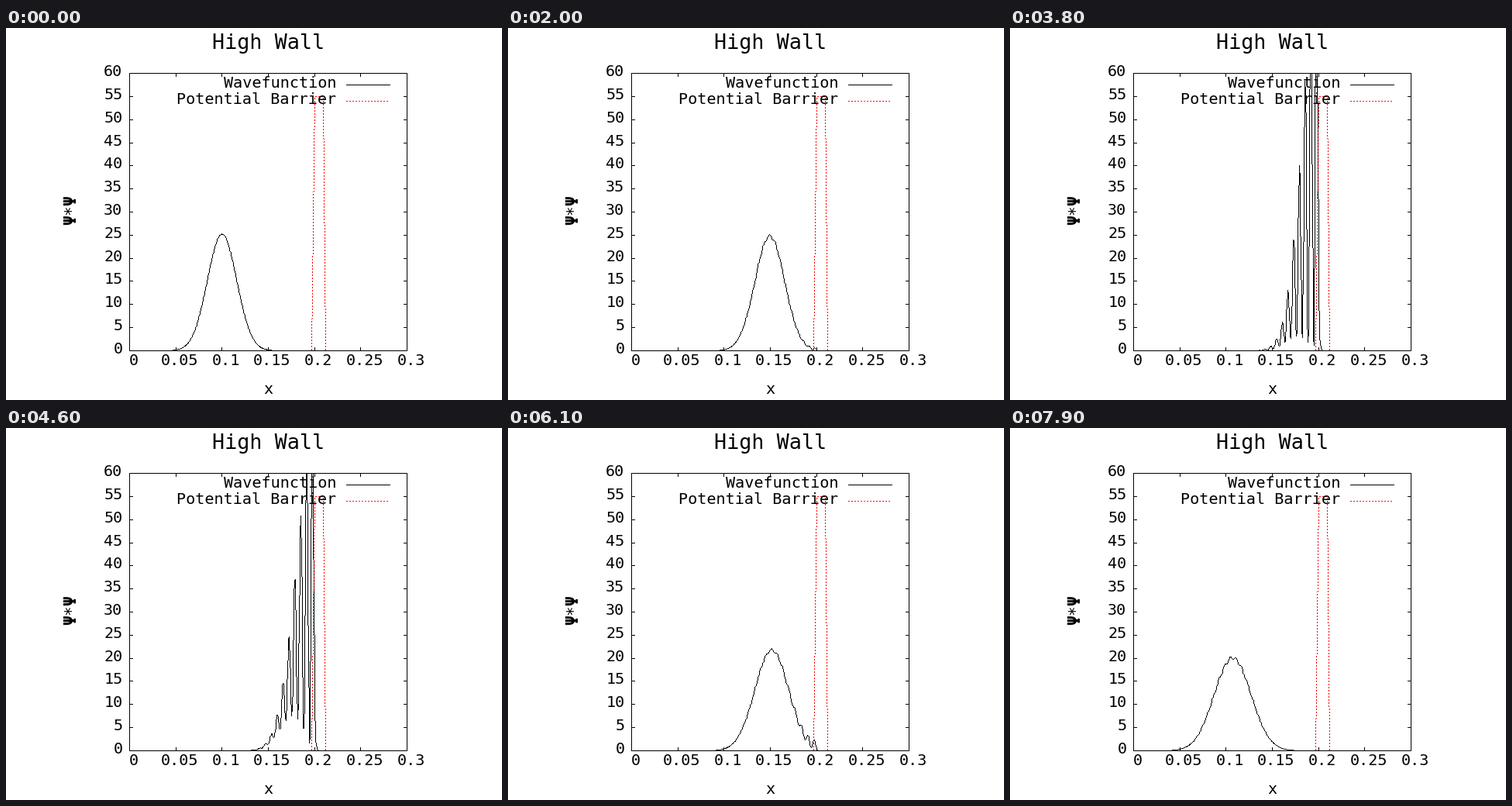
These frames come from a looping animation (640x480 px, 8 s). A matplotlib script:

```python
import numpy as np
import matplotlib.pyplot as plt
from matplotlib.animation import FuncAnimation

W, H, DPI = 640, 480, 100
FRAMES, INTERVAL = 80, 100
LEFT, RIGHT, TOP, BOTTOM = 159, 517, 58, 416
X_MAX, Y_MAX = 0.3, 60
PX = 72 / DPI
FONT, SIZE, TITLE_SIZE = "DejaVu Sans Mono", 20.2, 26.8
ADVANCE = 0.602
BLACK, RED = (0, 0, 0), (255, 0, 0)

# Wave packet (hbar = m = 1) and the wall it meets
DX, DT, STEPS = 0.0005, 2e-7, 25
K0, X0, VAR = 500, 0.1, 0.00025
WALL = (0.2, 0.21)
V0 = 3.5e5


def in_wall(x):
    return (x > WALL[0] - 1e-9) & (x < WALL[1] + 1e-9)


def hamiltonian(f, v):
    out = v * f
    out[1:-1] -= (f[2:] - 2 * f[1:-1] + f[:-2]) / (2 * DX**2)
    out[0] = out[-1] = 0
    return out


def evolve():
    """Leapfrog the packet and keep its density once per frame."""
    x = np.linspace(0, X_MAX, round(X_MAX / DX) + 1)
    v = np.where(in_wall(x), V0, 0.0)
    env = np.exp(-(x - X0) ** 2 / (4 * VAR)) / (2 * np.pi * VAR) ** 0.25
    re, im = env * np.cos(K0 * x), env * np.sin(K0 * x)
    density = []
    for _ in range(FRAMES):
        density.append(re**2 + im**2)
        for _ in range(STEPS):
            re += DT * hamiltonian(im, v)
            im -= DT * hamiltonian(re, v)
    return x, density


def to_px(x, y):
    """Map plot values to pixel positions."""
    return (LEFT + np.asarray(x) / X_MAX * (RIGHT - LEFT),
            BOTTOM - np.asarray(y) / Y_MAX * (BOTTOM - TOP))


def stroke(img, x, y, color=BLACK, dotted=False):
    """Draw a hard one-pixel polyline, clipped to the plot box."""
    x, y = np.round(x), np.round(y)
    length = np.maximum(abs(np.diff(x)), abs(np.diff(y)))
    s = np.concatenate([[0], np.cumsum(length)])
    keep = np.append(True, length > 0)
    t = np.arange(s[-1] + 1)
    if dotted:
        t = t[t % 4 < 2]
    col = np.round(np.interp(t, s[keep], x[keep])).astype(int)
    row = np.round(np.interp(t, s[keep], y[keep])).astype(int)
    inside = (row >= TOP) & (row <= BOTTOM)
    img[row[inside], col[inside]] = color


def draw_box(img):
    stroke(img, [LEFT, RIGHT, RIGHT, LEFT, LEFT], [TOP, TOP, BOTTOM, BOTTOM, TOP])
    for value in range(0, 61, 5):
        _, y = to_px(0, value)
        stroke(img, [LEFT, LEFT + 4], [y, y])
        stroke(img, [RIGHT - 4, RIGHT], [y, y])
    for i in range(7):
        x, _ = to_px(0.05 * i, 0)
        stroke(img, [x, x], [BOTTOM - 4, BOTTOM])
        stroke(img, [x, x], [TOP, TOP + 4])


fig = plt.figure(figsize=(W / DPI, H / DPI), dpi=DPI, facecolor="white")
ax = fig.add_axes([0, 0, 1, 1])
ax.axis("off")


def put(text, x, baseline, align=0.0, size=SIZE):
    """Place text so that the share `align` of its width lies left of x."""
    x -= align * len(text) * ADVANCE * size
    ax.text(x, baseline, text, family=FONT, size=size * PX, ha="left",
            va="baseline")


def draw_text():
    put("High Wall", 339, 27, 0.5, TITLE_SIZE)
    put("x", 338, 472, 0.5)
    put("Wavefunction", 427, 77, 1)
    put("Potential Barrier", 427, 98, 1)
    for value in range(0, 61, 5):
        _, y = to_px(0, value)
        put(str(value), 150.5, round(float(y)) + 4, 1)
    for i in range(7):
        x, _ = to_px(0.05 * i, 0)
        put(f"{0.05 * i:.2g}", x + 5.5, 435, 0.5)
    for char, y, weight in (("Ψ", 247.5, "bold"), ("*", 235, "normal"),
                            ("Ψ", 222.5, "bold")):
        ax.text(94, y, char, family=FONT, size=21 * PX, weight=weight,
                rotation=90, ha="right", va="center")


blank = np.full((H, W, 3), 255, np.uint8)
stroke(blank, [439, 495], [73, 73])
stroke(blank, [439, 494], [94, 94], RED, dotted=True)
grid = np.linspace(0, X_MAX, 100)
barrier = to_px(grid, np.where(in_wall(grid), 55, 0))
xs, densities = evolve()


def render(i):
    img = blank.copy()
    stroke(img, *to_px(xs, densities[i]))
    stroke(img, *barrier, RED, dotted=True)
    draw_box(img)
    return img


canvas = ax.imshow(render(0), extent=(0, W, H, 0), aspect="auto",
                   interpolation="nearest")
draw_text()


def update(i):
    canvas.set_data(render(i))
    return canvas,


anim = FuncAnimation(fig, update, frames=FRAMES, interval=INTERVAL,
                     repeat=True, repeat_delay=0, blit=False)
plt.show()
```
